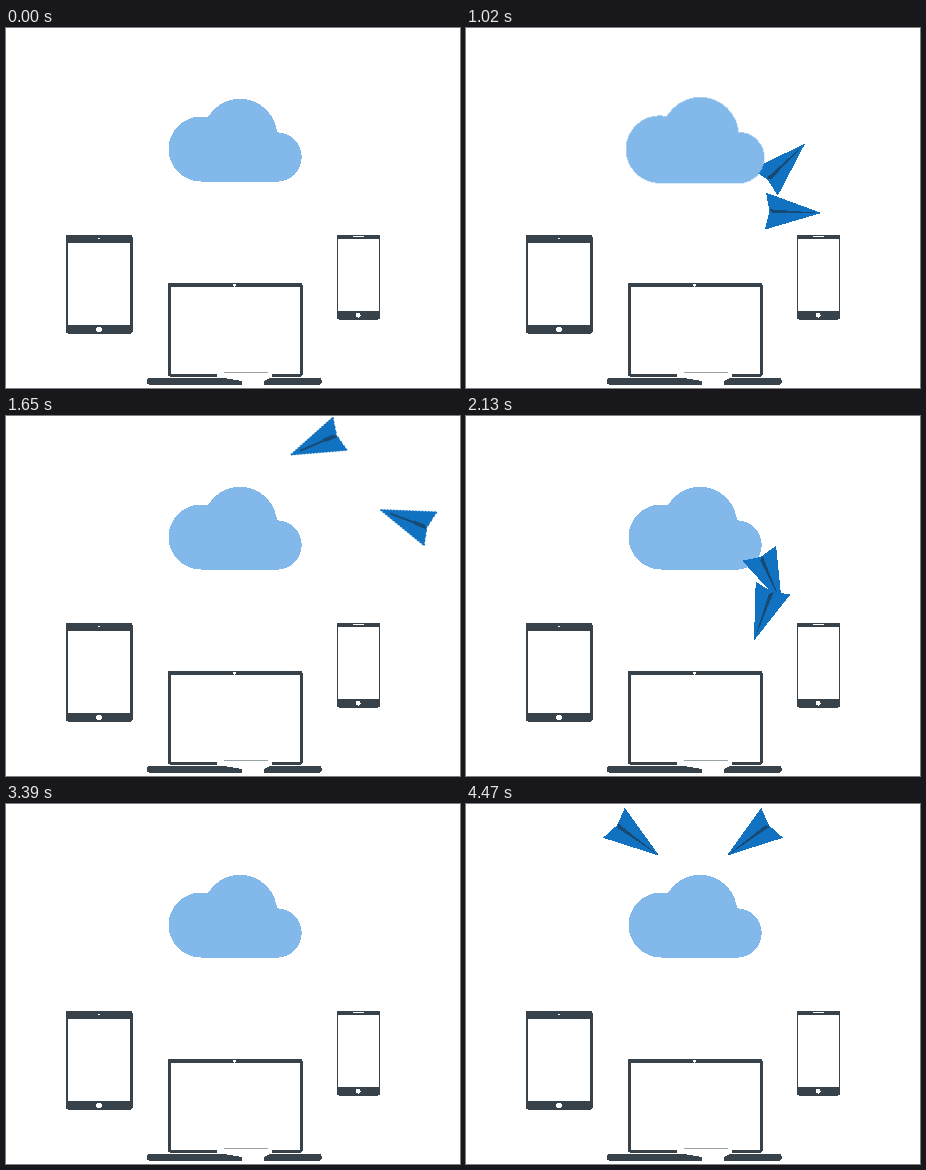
These frames come from a looping animation (454 px wide and 360 px high, 4500 ms). An HTML page:

```html
<!DOCTYPE html>
<html lang="en">
<head>
<meta charset="utf-8">
<title>Cloud sync</title>
<style>
  html, body { margin: 0; width: 100%; height: 100%; overflow: hidden; background: #fff; }
  svg { display: block; width: 454px; height: 360px; shape-rendering: crispEdges; }
  .dark { fill: #37424a; }
  .white { fill: #fff; }
  #cloud {
    fill: #82b9ea;
    transform-origin: 229px 112px;
    animation: swell 4.5s infinite;
  }
  /* Half a sine wave up and down, then rest */
  @keyframes swell {
    0% { transform: none; animation-timing-function: cubic-bezier(.36, .56, .63, 1); }
    12.3% { transform: scale(1.17); animation-timing-function: cubic-bezier(.37, 0, .64, .44); }
    24.6%, 100% { transform: none; }
  }
</style>
</head>
<body>
<svg viewBox="0 0 454 360">
  <defs>
    <g id="plane">
      <path fill="#1272c2" d="M29 0L-27 -18.5L-23 0L-27 18.5Z"/>
      <path fill="#174a75" d="M29 0L-23 -2L-20 2Z"/>
    </g>
  </defs>

  <g id="tablet">
    <rect class="dark" x="59.5" y="207" width="67" height="98.5" rx="2"/>
    <rect class="white" x="62" y="215" width="62" height="82"/>
    <circle class="white" cx="93" cy="210.5" r="1"/>
    <circle class="white" cx="93" cy="301.3" r="2.8"/>
  </g>

  <g id="phone">
    <rect class="dark" x="331" y="206.5" width="43" height="85" rx="2"/>
    <rect class="white" x="332" y="210.5" width="41" height="72.5"/>
    <rect class="white" x="347" y="208" width="11" height="1"/>
    <circle class="white" cx="352.3" cy="287.3" r="2.4"/>
  </g>

  <g id="laptop">
    <rect class="dark" x="161.5" y="255" width="135" height="93.5" rx="2"/>
    <rect class="white" x="165" y="259" width="129" height="87"/>
    <rect class="white" x="211" y="345" width="55" height="4"/>
    <rect x="218" y="344" width="44" height="1" fill="#9aa3a8"/>
    <circle class="white" cx="228.7" cy="257.2" r="1.5"/>
    <rect class="dark" x="141" y="350" width="174.5" height="6.5" rx="2"/>
    <path class="white" d="M212 349H266L258 353V357H236V353Z"/>
  </g>

  <g id="back"></g>
  <g id="cloud">
    <circle cx="195" cy="121" r="32.5"/>
    <circle cx="234" cy="108" r="37.2"/>
    <circle cx="271" cy="129" r="24.7"/>
    <rect x="195" y="110" width="76" height="43.6"/>
  </g>
  <g id="front"></g>
</svg>

<script>
  const LOOP = 4500;
  const HOME = { x: 235, y: 115 };
  const LAUNCH = 250, COAST = 210, FADE = 110;
  const RAD = Math.PI / 180;
  const back = document.getElementById('back');
  const front = document.getElementById('front');

  const stop = (t, x, y, deg) => ({ t, x, y, turn: deg * RAD });
  const mirror = ({ t, x, y, turn }) => ({ t, x: 454 - x, y, turn: Math.PI - turn });

  // A flight leaves the cloud, passes its stops and coasts straight on.
  function flight(speed, stops) {
    const [first] = stops;
    const turn = Math.atan2(first.y - HOME.y, first.x - HOME.x);
    const last = stops[stops.length - 1];
    const landing = {
      t: last.t + COAST,
      x: last.x + speed * COAST * Math.cos(last.turn),
      y: last.y + speed * COAST * Math.sin(last.turn),
      turn: last.turn
    };
    const el = document.createElementNS('http://www.w3.org/2000/svg', 'use');
    el.setAttribute('href', '#plane');
    back.append(el);
    return { el, speed, keys: [{ t: first.t - LAUNCH, ...HOME, turn }, ...stops, landing] };
  }

  const outer = [stop(3870, 311, 75, -51), stop(4470, 284.5, 34.5, 144)];
  const flights = [
    flight(0.4, [stop(1020, 318, 136, -44), stop(1650, 310, 28, 157), stop(2130, 304, 161.5, 66)]),
    flight(0.4, [stop(1020, 326, 184, 2), stop(1650, 400, 103.5, -159), stop(2130, 298, 197, 110)]),
    flight(0.3, outer),
    flight(0.3, outer.map(mirror))
  ];

  // Cubic Hermite value and slope on one axis
  function hermite(p, q, v, w, u) {
    const a = 2 * (p - q) + v + w;
    const b = 3 * (q - p) - 2 * v - w;
    return [((a * u + b) * u + v) * u + p, (3 * a * u + 2 * b) * u + v];
  }

  function pose(from, to, speed, t) {
    const span = to.t - from.t, u = (t - from.t) / span, d = speed * span;
    const [x, dx] = hermite(from.x, to.x, d * Math.cos(from.turn), d * Math.cos(to.turn), u);
    const [y, dy] = hermite(from.y, to.y, d * Math.sin(from.turn), d * Math.sin(to.turn), u);
    return `translate(${x} ${y}) rotate(${Math.atan2(dy, dx) / RAD})`;
  }

  function draw(t) {
    for (const { el, speed, keys } of flights) {
      const next = keys.findIndex(k => t < k.t);
      el.style.display = next > 0 ? '' : 'none';
      if (next <= 0) continue;

      // Planes pass in front of the cloud once they have turned around.
      const layer = next > 2 ? front : back;
      if (el.parentNode !== layer) layer.append(el);

      el.setAttribute('transform', pose(keys[next - 1], keys[next], speed, t));
      el.style.opacity = Math.min(1, (keys[keys.length - 1].t - t) / FADE);
    }
  }

  const start = performance.now();
  function tick() {
    draw((performance.now() - start) % LOOP);
    requestAnimationFrame(tick);
  }
  draw(0);
  requestAnimationFrame(tick);
</script>
</body>
</html>
```
